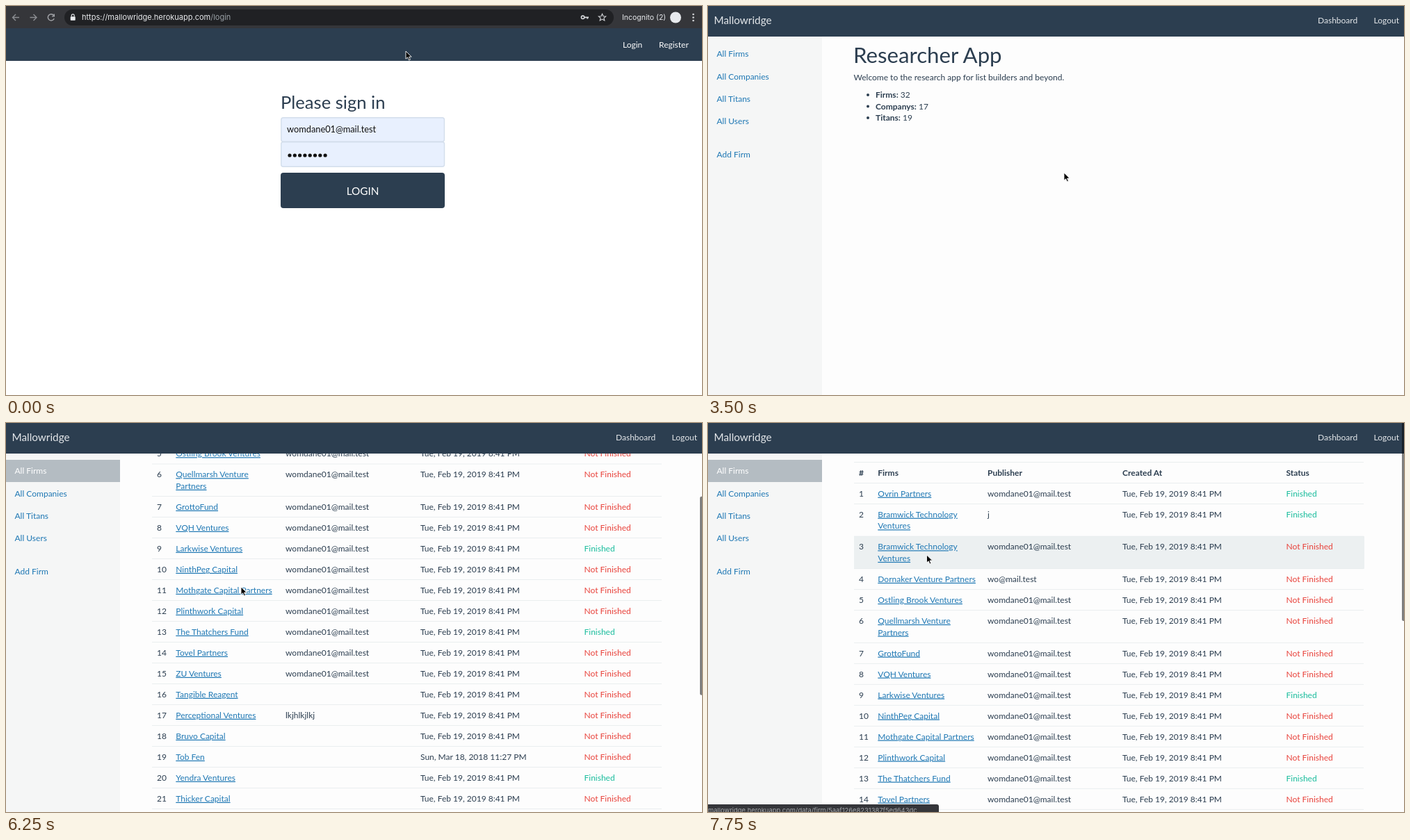
An HTML page that plays this animation: 1001x560 px, repeating every 8 s.

```html
<!DOCTYPE html>
<html lang="en">
<head>
<meta charset="utf-8">
<title>Researcher App</title>
<style>
  html, body { margin: 0; width: 100%; height: 100%; overflow: hidden; background: #fff; }
  svg { display: block; width: 1001px; height: 560px; }
  text { font: 12px Lato, sans-serif; fill: #2c3e50; white-space: pre; }
  .ui { font-family: Inter, sans-serif; font-size: 11px; fill: #e8eaed; }
  .small { font-size: 9.4px; fill: #a4a7ab; }
  .dim { fill: #9aa0a6; }
  .bold { font-weight: 700; }
  .h1 { font-size: 31.2px; }
  .h2 { font-size: 25.6px; }
  .big { font-size: 15.3px; }
  .field { font-size: 12.8px; fill: #111; }
  .light { fill: #fff; }
  .nav { fill: #e4e7ea; }
  .link { fill: #1f78b4; }
  .under { text-decoration: underline; }
  .yes { fill: #18bc9c; }
  .no { fill: #e8413a; }
</style>
</head>
<body>
<svg id="stage" viewBox="0 0 1001 560"></svg>
<script>
(() => {
const STEP = 250, LOOP = 8000;
const NAVY = '#2c3e50', SITE = 'mallowridge.herokuapp.com', MAIL = 'womdane01@mail.test';
const stage = document.getElementById('stage');

function add(parent, tag, attrs = {}, content) {
  const el = document.createElementNS('http://www.w3.org/2000/svg', tag);
  for (const k in attrs) el.setAttribute(k, attrs[k]);
  if (content !== undefined) el.textContent = content;
  parent.appendChild(el);
  return el;
}
const group = parent => add(parent, 'g');
const rect = (p, x, y, width, height, fill, more) => add(p, 'rect', { x, y, width, height, fill, ...more });
const text = (p, x, y, str, cls = '') => add(p, 'text', { x, y, class: cls }, str);
const circle = (p, cx, cy, r, fill) => add(p, 'circle', { cx, cy, r, fill });
const stroke = (p, d, color, w = 1.4) => add(p, 'path', { d, fill: 'none', stroke: color, 'stroke-width': w });
const show = (el, on) => el.setAttribute('display', on ? 'inline' : 'none');
const shift = (el, x, y) => el.setAttribute('transform', `translate(${x} ${y})`);

// Sign-in page
const login = group(stage);
rect(login, 0, 0, 1001, 560, '#fff');
rect(login, 0, -10, 1001, 54, NAVY);
text(login, 887, 25, 'Login', 'light');
text(login, 939, 25, 'Register', 'light');
text(login, 395, 113, 'Please sign in', 'h2');
rect(login, 395.7, 160.7, 234.8, 35.6, '#e8f0fe', { rx: 3, stroke: '#d3deec', 'stroke-width': 1.4 });
const mailBox = rect(login, 395.8, 125.8, 234.6, 34.4, '#e8f0fe', { rx: 3 });
text(login, 404, 147.3, MAIL, 'field');
for (let i = 0; i < 8; i++) circle(login, 408 + i * 7.3, 180, 2.6, '#111');
const ring = rect(login, 394, 204, 238, 53, 'none', { rx: 5, stroke: '#8db7ea', 'stroke-width': 3 });
rect(login, 395, 205, 236, 51, NAVY, { rx: 4 });
text(login, 513, 236.5, 'LOGIN', 'big light').setAttribute('text-anchor', 'middle');

// Signed-in pages
const app = group(stage);
rect(app, 0, 0, 1001, 560, '#fdfdfd');
const home = group(app);
text(home, 209, 81.5, 'Researcher App', 'h1');
text(home, 209.5, 107, 'Welcome to the research app for list builders and beyond.');
[['Firms:', 32], ['Companys:', 17], ['Titans:', 19]].forEach(([label, n], i) => {
  const y = 132 + i * 16.5;
  circle(home, 230, y - 4, 2, NAVY);
  const line = text(home, 241, y, '');
  add(line, 'tspan', { class: 'bold' }, label);
  add(line, 'tspan', {}, ' ' + n);
});

const firms = ['Ovrin Partners', 'Bramwick Technology|Ventures', 'Bramwick Technology|Ventures',
  'Dornaker Venture Partners', 'Ostling Brook Ventures', 'Quellmarsh Venture|Partners', 'GrottoFund',
  'VQH Ventures', 'Larkwise Ventures', 'NinthPeg Capital', 'Mothgate Capital Partners',
  'Plinthwork Capital', 'The Thatchers Fund', 'Tovel Partners', 'ZU Ventures', 'Tangible Reagent',
  'Perceptional Ventures', 'Bruvo Capital', 'Tob Fen', 'Yendra Ventures', 'Thicker Capital',
  'Nubrel Ventures', 'Osterholt Partners', 'Pellgrave Capital', 'Quornby Ventures',
  'Rustlemere Partners', 'Sennowick Capital', 'Tharnley Ventures'];
const finished = [1, 2, 9, 13, 20];
const publishers = { 2: 'j', 4: 'wo@mail.test', 17: 'lkjhlkjlkj' };
const columns = [217, 244.3, 402, 596, 831.5];

const table = group(app);
const rowHover = rect(table, 210, 0, 734, 30, '#ecf0f1');
const rule = y => rect(table, 210, y - 0.4, 733, 0.8, '#e6ebed');
rule(56.5);
['#', 'Firms', 'Publisher', 'Created At', 'Status'].forEach((s, i) => text(table, columns[i], 75.7, s, 'bold'));
const rows = [];
let rowTop = 86.5;
firms.forEach((name, i) => {
  const n = i + 1, y = rowTop + 19.2, lines = name.split('|');
  const height = lines.length > 1 ? 46.6 : 30;
  rule(rowTop);
  text(table, columns[0], y, n);
  lines.forEach((s, k) => text(table, columns[1], y + k * 16.6, s, 'link under'));
  text(table, columns[2], y, publishers[n] || (n <= 15 ? MAIL : ''));
  text(table, columns[3], y, n === 19 ? 'Sun, Mar 18, 2018 11:27 PM' : 'Tue, Feb 19, 2019 8:41 PM');
  const done = finished.includes(n);
  text(table, columns[4], y, done ? 'Finished' : 'Not Finished', done ? 'yes' : 'no');
  rows[n] = { y: rowTop, height };
  rowTop += height;
});

rect(app, 0, 0, 1001, 44, NAVY);
text(app, 8.5, 26, 'Mallowridge', 'big nav');
text(app, 877, 25, 'Dashboard', 'nav');
text(app, 957.5, 25, 'Logout', 'nav');
rect(app, 0, 44, 164, 516, '#f5f6f6');
const active = rect(app, 0, 53, 164, 32, '#b4bcc2');
const sideLinks = ['All Firms', 'All Companies', 'All Titans', 'All Users', 'Add Firm']
  .map((s, i) => text(app, 12.5, 73.3 + i * 32.3 + (i > 3 ? 15.8 : 0), s, 'link'));
const thumb = rect(app, 998, 0, 5, 286, '#000', { rx: 2.5, opacity: 0.5 });

// Link preview at the bottom edge
const preview = group(stage);
const previewBox = rect(preview, -5, 549, 217, 20, '#35363a', { rx: 3 });
const previewText = text(preview, 0, 560.5, '', 'ui small');

// Browser toolbar
const bar = group(stage);
rect(bar, 0, -5, 1001, 37, '#35363a');
rect(bar, 84, 5, 790, 23, '#202124', { rx: 11.5 });
stroke(bar, 'M19 16.5H9.5M14 12l-4.5 4.5L14 21', '#8b8d91');
stroke(bar, 'M34.5 16.5H44M39.5 12l4.5 4.5L39.5 21', '#8b8d91');
stroke(bar, 'M68.6 13.6A4.6 4.6 0 1 0 69.2 18M69.3 11.5v3.4H66', '#a5a7ab');
rect(bar, 92.7, 15.3, 7, 5.5, '#e8eaed', { rx: 0.8 });
stroke(bar, 'M94.2 15.5v-1.6a2 2 0 0 1 4 0v1.6', '#e8eaed', 1.1);
const url = text(bar, 109, 20.3, '', 'ui');
add(url, 'tspan', {}, 'https://' + SITE);
add(url, 'tspan', { class: 'dim' }, '/login');
stroke(bar, 'M832 16.3h6M836.3 16.3v2.3', '#d5d7da', 1.8);
add(bar, 'circle', { cx: 829.6, cy: 16.3, r: 2.2, fill: 'none', stroke: '#d5d7da', 'stroke-width': 1.6 });
stroke(bar, 'M857.5 11.3l1.5 3.4 3.7.3-2.8 2.4.9 3.6-3.3-1.9-3.3 1.9.9-3.6-2.8-2.4 3.7-.3z', '#d5d7da', 1.1);
text(bar, 886, 20.3, 'Incognito (2)', 'ui').style.fontSize = '10.5px';
circle(bar, 963, 16.5, 8, '#e8eaed');
for (const y of [12, 16.5, 21]) circle(bar, 988.5, y, 1.3, '#d5d7da');

const cursor = add(stage, 'path', {
  d: 'M0 0V11.2L2.6 8.8L4.5 13L6.4 12.2L4.6 8.1H8.2Z',
  fill: '#000', stroke: '#fff', 'stroke-width': 0.9, 'stroke-linejoin': 'round'
});

// Each key: time in seconds, then values, joined by straight lines
const cursorKeys = [[0, 575, 65], [0.75, 525, 146], [1.25, 525, 146], [1.5, 518, 200], [1.75, 512, 240],
  [3.75, 512, 240], [4, 490, 225], [4.5, 220, 100], [4.75, 132, 73], [5, 125, 70], [5.25, 125, 70],
  [5.75, 338, 236], [7.5, 338, 236], [7.75, 314.5, 190]];
const scrollKeys = [[5.5, 0], [5.75, 26], [6, 120], [6.25, 210.7], [6.5, 300], [6.75, 330],
  [7, 190], [7.25, 36.3], [7.5, 0]];
const barKeys = [[0.25, 35], [0.5, 12], [0.75, 0]];
// Held values: start time and value
const hoverKeys = [[0, 0], [5.5, 2], [5.75, 4], [6.75, 15], [7.5, 4], [7.75, 3]];
const previewKeys = [[0, '', 0], [2.5, `Waiting for ${SITE}...`, 190], [3.5, '', 0],
  [4.75, `https://${SITE}/data/firms/`, 212], [5.5, '', 0],
  [7.75, `${SITE}/data/firm/5aaf126e8231387f5ed643dc`, 332]];

const held = (keys, s) => keys.filter(k => k[0] <= s).pop();
function along(keys, s) {
  const b = keys.findIndex(k => k[0] > s);
  if (b === 0) return keys[0].slice(1);
  if (b < 0) return keys[keys.length - 1].slice(1);
  const from = keys[b - 1], to = keys[b], f = (s - from[0]) / (to[0] - from[0]);
  return from.slice(1).map((v, i) => v + (to[i + 1] - v) * f);
}

function draw(ms) {
  const s = Math.floor((ms % LOOP) / STEP) * STEP / 1000;
  const [drop] = along(barKeys, s), [scroll] = along(scrollKeys, s);
  const signedIn = s >= 3, listing = s >= 5.25;

  show(login, !signedIn);
  show(app, signedIn);
  shift(login, 0, drop);
  shift(bar, 0, drop - 35);
  show(bar, drop > 0);

  const focused = s >= 1.25 && s < 2.25;
  mailBox.setAttribute('stroke', focused ? NAVY : '#d3deec');
  mailBox.setAttribute('stroke-width', focused ? 1.7 : 1.4);
  show(ring, s >= 2.25);

  show(home, !listing);
  show(table, listing);
  shift(table, 0, -scroll);
  const row = rows[held(hoverKeys, s)[1]];
  show(rowHover, !!row);
  if (row) {
    rowHover.setAttribute('y', row.y);
    rowHover.setAttribute('height', row.height);
  }
  show(active, s >= 4.75);
  active.setAttribute('fill', listing ? '#b4bcc2' : '#e9edee');
  sideLinks[0].setAttribute('class', listing ? 'light' : 'link');
  show(thumb, s >= 5.75);
  thumb.setAttribute('y', scroll * 0.507 - 1);

  const [, label, width] = held(previewKeys, s);
  show(preview, !!label);
  preview.setAttribute('opacity', s === 3.25 ? 0.5 : 1);
  previewText.textContent = label;
  previewBox.setAttribute('width', width + 5);
  shift(cursor, ...along(cursorKeys, s));
}

const start = performance.now();
function tick() {
  draw(performance.now() - start);
  requestAnimationFrame(tick);
}
draw(0);
requestAnimationFrame(tick);
})();
</script>
</body>
</html>
```
